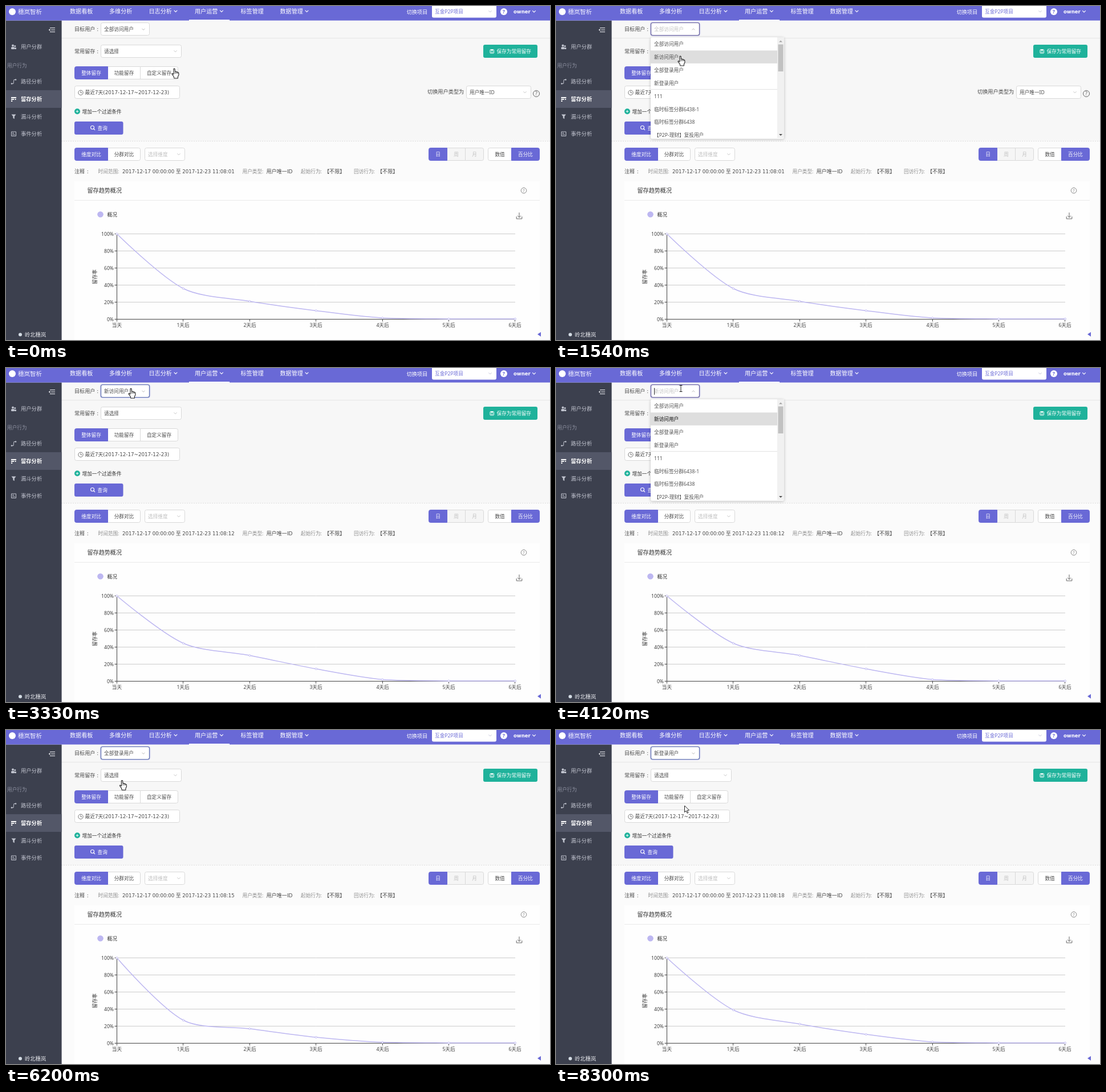
An HTML page with a canvas for the animation above (8.45 s loop, 954x587 px).

```html
<!DOCTYPE html>
<html lang="zh-CN">
<head>
<meta charset="utf-8">
<title>留存分析</title>
<style>
html, body { margin: 0; width: 100%; height: 100%; overflow: hidden; background: #fbfbfb; }
canvas { display: block; }
</style>
</head>
<body>
<canvas id="stage" width="954" height="587"></canvas>
<script>
const ctx = document.getElementById('stage').getContext('2d');
const LOOP = 8450;
const CJK = '"Noto Sans CJK SC", "Noto Sans CJK JP", "Noto Sans CJK", sans-serif';
const SANS = '"Noto Sans", ' + CJK;
const WIDE = '"DejaVu Sans", ' + CJK;
const PURPLE = '#6969d6', TEAL = '#1fb29b', INK = '#4a4a4a', LINE = '#d9d9d9', SOFT = '#bdb7f1';

const users = ['全部访问用户', '新访问用户', '全部登录用户', '新登录用户'];
const groups = ['111', '临时标签分群6438-1', '临时标签分群6438', '【P2P-理财】复投用户'];
const curves = [
  [100, 36, 21, 10, 1.5, .4, .4],
  [100, 44.5, 30.2, 14.5, 2, .4, .4],
  [100, 27, 17, 7, 1.1, .4, .4],
  [100, 39, 22.5, 10.4, 1.5, .4, .4]
];
const seconds = ['01', '12', '15', '18'];
const menus = [
  { open: 440, close: 1750, blink: 0 },
  { open: 3850, close: 5030, blink: 3770 },
  { open: 6620, close: 7650, blink: 6620 }
];
const morphs = [[2110, 2415], [5500, 5820], [8000, 8295]];
const path = [
  [70, 295, 110], [380, 219, 37], [560, 219, 37], [840, 219, 91], [1000, 219, 91],
  [1250, 220, 84], [1520, 218, 88], [2980, 218, 88], [3320, 219, 36], [4180, 219, 36],
  [4500, 218, 119], [5050, 218, 119], [5270, 217, 111], [5360, 217, 111], [5820, 217, 114],
  [6080, 217, 114], [6250, 200, 82], [6430, 216, 37], [6910, 216, 37], [7440, 225.5, 133]
];

const clamp = v => Math.max(0, Math.min(1, v));
const smooth = v => v * v * (3 - 2 * v);
const cubicOut = v => 1 - (1 - v) ** 3;

function text(s, x, y, size = 8.65, color = INK, o = {}) {
  ctx.font = `${o.weight || 400} ${size}px ${o.font || SANS}`;
  ctx.textAlign = o.align || 'left';
  ctx.fillStyle = color;
  ctx.fillText(s, x, y + size * .37);
}
function rect(x, y, w, h, color) {
  ctx.fillStyle = color;
  ctx.fillRect(x, y, w, h);
}
function box(x, y, w, h, fill, stroke, r = 3, lw = 1) {
  ctx.beginPath();
  ctx.roundRect(x, y, w, h, r);
  if (fill) { ctx.fillStyle = fill; ctx.fill(); }
  if (stroke) { ctx.strokeStyle = stroke; ctx.lineWidth = lw; ctx.stroke(); }
}
function line(pts, color, lw = 1) {
  ctx.beginPath();
  pts.forEach(p => ctx.lineTo(p[0], p[1]));
  ctx.strokeStyle = color;
  ctx.lineWidth = lw;
  ctx.stroke();
}
function poly(pts, fill, stroke, lw = 1) {
  ctx.beginPath();
  pts.forEach(p => ctx.lineTo(p[0], p[1]));
  ctx.closePath();
  ctx.fillStyle = fill;
  ctx.fill();
  if (stroke) { ctx.strokeStyle = stroke; ctx.lineWidth = lw; ctx.stroke(); }
}
function disc(x, y, r, fill, stroke, lw = 1) {
  ctx.beginPath();
  ctx.arc(x, y, r, 0, 7);
  if (fill) { ctx.fillStyle = fill; ctx.fill(); }
  if (stroke) { ctx.strokeStyle = stroke; ctx.lineWidth = lw; ctx.stroke(); }
}
function chevron(x, y, color, up = 1, w = 2.5, lw = 1) {
  line([[x - w, y - up * w / 2], [x, y + up * w / 2], [x + w, y - up * w / 2]], color, lw);
}
function help(x, y, r, color) {
  disc(x, y, r, null, color);
  text('?', x, y, r * 1.6, color, { align: 'center' });
}
function select(x, y, w, label, color = INK) {
  box(x + .5, y + .5, w, 22, '#fff', LINE);
  text(label, x + 6, y + 12, 8.65, color);
  chevron(x + w - 10, y + 11.5, '#c4c4c4');
}
// Joined buttons; kind is 'on', 'off' or 'dim'. The active one overlaps its neighbours.
function tabs(y, edges, labels, kinds) {
  const end = labels.length - 1;
  const order = [...labels.keys()].sort((a, b) => (kinds[a] === 'on') - (kinds[b] === 'on'));
  order.forEach(i => {
    const x = edges[i], w = edges[i + 1] - x, k = kinds[i];
    const first = i === 0 ? 3 : 0, last = i === end ? 3 : 0;
    const fill = { on: PURPLE, off: '#fff', dim: '#f5f5f5' }[k];
    box(x + .5, y + .5, w, 22, fill, k === 'on' ? PURPLE : LINE, [first, last, last, first]);
    text(labels[i], x + w / 2 + .5, y + 12, 8.65, { on: '#fff', off: INK, dim: '#c0c0c0' }[k],
      { align: 'center', weight: k === 'on' ? 500 : 400 });
  });
}

function header() {
  rect(0, 0, 954, 25.5, PURPLE);
  disc(11, 10, 6, '#fff');
  text('穗岚智析', 21, 10.5, 10.5, '#f0f0ff', { weight: 500 });
  [['数据看板', 112], ['多维分析', 181], ['日志分析', 250.5, 1], ['用户运营', 331, 1],
   ['标签管理', 411.5], ['数据管理', 480.5, 1]].forEach(([s, x, sub]) => {
    text(s, x, 9, 10.1, '#fff', { weight: 500 });
    if (sub) chevron(x + 47, 9, '#fff', 1, 2.8, 1.1);
  });
  rect(321, 24, 71, 2, '#fff');
  text('切换项目', 702.5, 10.5, 9.2, '#fff');
  box(747, -4, 113, 24.5, '#fff', null);
  text('互金P2P项目', 752, 10, 8.65, PURPLE);
  chevron(849, 9.5, '#c4c4d8');
  disc(873, 10, 6, '#fff');
  text('?', 873, 10, 9, PURPLE, { align: 'center', weight: 700 });
  text('owner', 890, 9.5, 8.5, '#fff', { weight: 700, font: WIDE });
  chevron(926, 9.5, '#fff', 1, 2.8, 1.1);
}

function sidebar() {
  const c = '#c0c3ce';
  rect(0, 25.5, 97.6, 562, '#3c404e');
  rect(0, 148, 97.6, 31, '#535768');
  [38.5, 42, 45.5].forEach((y, i) => line([[i === 1 ? 79 : 77, y], [86, y]], '#e4e5ea', 1.1));
  poly([[74.5, 42], [77.5, 40], [77.5, 44]], '#e4e5ea');
  text('用户行为', 2, 104.5, 8.65, '#8d90a0');
  [['用户分群', 72], ['路径分析', 133], ['留存分析', 163.5], ['漏斗分析', 194.5], ['事件分析', 225]]
    .forEach(([s, y]) => {
      const on = y === 163.5;
      text(s, 26, y, 9.3, on ? '#fff' : c, { weight: on ? 700 : 400 });
    });
  disc(12, 69.5, 1.9, c);
  box(9, 72, 6, 4, c, null, 1.5);
  disc(15.8, 70.5, 1.5, c);
  box(15, 73, 3, 3, c, null, 1);
  line([[10, 136.5], [13, 136.5], [13.5, 132], [14, 129.5], [17, 129.5]], c);
  disc(10, 136.5, 1.3, c);
  disc(17, 129.5, 1.3, c);
  rect(9, 160, 9, 2, '#fff');
  rect(9, 163, 5, 2, '#fff');
  rect(9, 166, 2.2, 2, '#fff');
  rect(15.5, 163, 2, 2, '#fff');
  poly([[9.5, 190.5], [17.5, 190.5], [14.8, 194], [14.8, 198.5], [12.3, 197], [12.3, 194]], c);
  box(9.5, 221, 8, 7.5, null, c, 0);
  line([[11, 223.5], [14, 223.5]], c);
  line([[11, 226], [16, 226]], c);
  disc(25, 577.5, 3, '#d3dbe3');
  text('岭北穗岚', 33, 577.5, 9.3, '#e9eaef');
}

function form(s) {
  rect(97, 25.5, 857, 212, '#f7f7f7');
  rect(97, 56, 857, 1, '#e6e6e6');
  ctx.setLineDash([2, 2]);
  line([[97, 237.5], [954, 237.5]], '#dedede');
  ctx.setLineDash([]);

  text('目标用户', 120, 41, 9.1);
  text(':', 159.5, 41, 9.1);
  const focus = s.t > menus[0].open;
  if (focus) box(165.5, 28.5, 87, 24, null, 'rgba(105,105,214,.2)', 4, 2);
  box(166.5, 29.5, 85, 22, '#fff', focus ? (s.open ? '#625b9b' : '#5a6cae') : LINE, 3, focus ? 1.2 : 1);
  text(users[s.pick], 172, 41, 8.65, s.open ? '#c2c2c2' : INK);
  chevron(241, 41, '#bbb', s.open ? -1 : 1);
  if (s.caret) rect(172, 35, 1, 12, '#333');

  text('常用留存', 120, 80, 9.1);
  text(':', 159.5, 80, 9.1);
  select(166, 68, 141, '请选择');
  if (s.hover) box(166.5, 68.5, 141, 22, null, '#6c6c98', 3, 1.1);

  box(837, 68, 95, 23, TEAL, null);
  box(849, 76.5, 6.5, 6.5, null, '#fff', 1);
  rect(850.5, 76.5, 3.5, 2.2, '#fff');
  rect(850.5, 80.5, 3.5, 1, '#fff');
  text('保存为常用留存', 860.5, 80, 8.65, '#fff', { weight: 500 });

  tabs(106, [120, 178, 235, 301], ['整体留存', '功能留存', '自定义留存'], ['on', 'off', 'off']);
  box(120.5, 140.5, 184, 22, '#fff', LINE);
  disc(131, 152.3, 4.2, null, '#666', .9);
  line([[131, 149.5], [131, 152.5], [133.3, 152.5]], '#666', .9);
  text('最近7天(2017-12-17~2017-12-23)', 138.5, 152, 8.75, INK, { font: WIDE });
  if (s.t < menus[0].close) {
    text('切换用户类型为', 739, 151, 9.2);
    select(807, 140, 113, '用户唯一ID');
    help(930, 154, 5.5, '#666');
  }
  disc(125, 185.3, 5, TEAL);
  line([[122.7, 185.3], [127.3, 185.3]], '#fff');
  line([[125, 183], [125, 187.6]], '#fff');
  text('增加一个过滤条件', 133.5, 185.7, 8.65, '#333');
  box(120, 203, 85.5, 23, PURPLE, null);
  disc(151.5, 213.5, 3, null, '#fff', 1.1);
  line([[153.6, 215.6], [156, 218]], '#fff', 1.2);
  text('查询', 160.5, 215, 8.65, '#fff', { weight: 500 });
}

function report(s) {
  rect(97, 238, 857, 349, '#fbfbfb');
  tabs(249, [120, 178, 235], ['维度对比', '分群对比'], ['on', 'off']);
  select(243, 249, 70, '选择维度', '#c0c0c0');
  tabs(249, [741, 773, 805, 837], ['日', '周', '月'], ['on', 'dim', 'dim']);
  tabs(249, [845, 886, 935], ['数值', '百分比'], ['off', 'on']);

  text('注释', 120, 290.5, 9.1);
  text(':', 142, 290.5, 9.1);
  [['时间范围:', 161.5], ['用户类型:', 414.5], ['起始行为:', 517], ['回访行为:', 610]]
    .forEach(([l, x]) => text(l, x, 290.5, 8.65, '#8c8c8c'));
  text(`2017-12-17 00:00:00 至 2017-12-23 11:08:${seconds[s.pick]}`, 204, 290.5, 8.6, INK, { font: WIDE });
  text('用户唯一ID', 456.5, 290.5, 9.1, INK, { font: WIDE });
  text('【不限】', 558, 290.5, 9.1);
  text('【不限】', 651, 290.5, 9.1);

  rect(120, 308, 816, 279, '#fefefe');
  rect(120, 341, 816, 1, '#e9e9e9');
  text('留存趋势概况', 142.5, 324.5, 10.1, '#333', { weight: 500 });
  help(908, 324.3, 4.8, '#888');
  disc(165.5, 366.3, 5.3, SOFT);
  text('概况', 177.5, 367, 8.65, '#333', { weight: 500 });
  line([[900, 363], [900, 371.5]], '#666');
  line([[897, 368.5], [900, 371.5], [903, 368.5]], '#666');
  line([[895.2, 370], [895.2, 374], [904.8, 374], [904.8, 370]], '#666');
  chart(s.values);
  poly([[932, 577], [938, 573], [938, 581]], PURPLE);
}

function chart(values) {
  const left = 194.5, step = 116.4, base = 550.5, bend = .3;
  for (let i = 0; i <= 5; i++) {
    const y = base - i * 30;
    if (i) line([[left, y], [893, y]], '#ccc');
    line([[left - 4, y], [left, y]], '#444');
    text(i * 20 + '%', 189, y + .3, 8.65, '#444', { align: 'right' });
  }
  line([[left, 400], [left, base]], '#444');
  line([[left, base], [893, base]], '#444');
  for (let i = 0; i < 7; i++) {
    const x = Math.floor(left + i * step) + .5;
    line([[x, base], [x, base + 4]], '#444');
    text(i ? i + '天后' : '当天', x, 560.5, 8.65, '#444', { align: 'center' });
  }
  ctx.save();
  ctx.translate(155.5, 476);
  ctx.rotate(-Math.PI / 2);
  text('留存率', 0, 0, 8.65, '#333', { align: 'center', weight: 500 });
  ctx.restore();

  const pts = values.map((v, i) => [left + i * step, base - v * 1.5]);
  const dist = (a, b) => Math.hypot(a[0] - b[0], a[1] - b[1]);
  const keep = y => Math.max(pts[0][1], Math.min(pts[6][1], y));
  let out = pts[0];
  ctx.beginPath();
  ctx.moveTo(...pts[0]);
  for (let i = 1; i < 7; i++) {
    const p = pts[i], prev = pts[i - 1], next = pts[i + 1];
    let into = p, after = p;
    if (next) {
      const vx = (next[0] - prev[0]) * bend, vy = (next[1] - prev[1]) * bend;
      const r = dist(p, next) / (dist(p, next) + dist(p, prev));
      into = [p[0] - vx * (1 - r), keep(p[1] - vy * (1 - r))];
      after = [p[0] + vx * r, keep(p[1] + vy * r)];
    }
    ctx.bezierCurveTo(...out, ...into, ...p);
    out = after;
  }
  ctx.strokeStyle = SOFT;
  ctx.lineWidth = 1.5;
  ctx.stroke();
  pts.forEach(p => disc(p[0], p[1], 1.6, '#fff', SOFT, .9));
}

function dropdown(s) {
  if (s.show <= 0) return;
  ctx.save();
  ctx.globalAlpha = s.show;
  ctx.translate(0, 55);
  ctx.scale(1, .8 + .2 * s.show);
  ctx.translate(0, -55);
  ctx.shadowColor = 'rgba(0,0,0,.24)';
  ctx.shadowBlur = 5;
  ctx.shadowOffsetY = 1;
  box(166, 55, 234, 178.5, '#fff', null);
  ctx.shadowColor = 'transparent';
  ctx.beginPath();
  ctx.rect(166, 55, 234, 177);
  ctx.clip();
  rect(166, 55.5 + s.row * 22.7, 222, 22.7, '#dedede');
  users.forEach((u, i) =>
    text(u, 172, 67.2 + i * 22.7, 8.65, '#505050', { weight: i && i === s.chosen ? 700 : 400 }));
  rect(166, 146, 222, 1, '#e2e2e2');
  groups.forEach((g, i) => text(g, 172, 158.8 + i * 22.7, 8.65, '#555'));
  rect(388, 55, 12, 178, '#f1f1f1');
  rect(389.5, 67.5, 9, 47.5, '#c1c1c1');
  poly([[391, 63.5], [394, 60.5], [397, 63.5]], '#a3a3a3');
  poly([[391, 225], [394, 228], [397, 225]], '#505050');
  ctx.restore();
}

function pointer({ x, y, kind }) {
  ctx.save();
  ctx.translate(x, y);
  ctx.lineJoin = 'round';
  if (kind === 'beam') {
    line([[-2.5, -5.5], [2.5, -5.5]], '#222');
    line([[-2.5, 5.5], [2.5, 5.5]], '#222');
    line([[0, -5.5], [0, 5.5]], '#222');
  } else if (kind === 'arrow') {
    poly([[0, 0], [0, 11.5], [2.7, 9], [4.6, 13.3], [6.4, 12.4], [4.6, 8.3], [8, 8]], '#fff', '#222');
  } else {
    poly([[-1, .8], [0, 0], [1.2, .8], [1.4, 5.2], [3.2, 5], [3.8, 6], [5.5, 5.8], [6.2, 6.8],
      [7.7, 7], [8, 11], [6.5, 14], [6.3, 17], [-.2, 17], [-.8, 14], [-4, 9.6],
      [-3.4, 8.4], [-1, 10]], '#fff', '#222', 1.1);
    [1.5, 3.8, 6].forEach(fx => line([[fx, 6], [fx, 9]], '#222', .8));
  }
  ctx.restore();
}

function place(t) {
  const i = path.findIndex(k => k[0] > t);
  if (i === 0) return path[0].slice(1);
  if (i < 0) return path[path.length - 1].slice(1);
  const a = path[i - 1], b = path[i], k = smooth((t - a[0]) / (b[0] - a[0]));
  return [a[1] + (b[1] - a[1]) * k, a[2] + (b[2] - a[2]) * k];
}

function stateAt(t) {
  const [x, y] = place(t);
  const menu = menus.find(m => t >= m.open && t < m.close);
  const pick = menus.filter(m => t >= m.close).length;
  const last = menus.filter(m => t >= m.open).pop();
  let show = 0;
  if (last) show = smooth(clamp((t - last.open) / 200)) * (1 - smooth(clamp((t - last.close) / 200)));
  const values = curves[0].map((v, i) => morphs.reduce((from, [a, b], n) =>
    from + (curves[n + 1][i] - from) * cubicOut(clamp((t - a) / (b - a))), v));

  const overSelect = y >= 68 && y < 91;
  const overField = y < 52 || overSelect || (y >= 106 && y < 130);
  const kind = menu ? (y < 52 ? 'beam' : 'hand') : (overField ? 'hand' : 'arrow');
  const chosen = menu ? pick : pick - 1;
  const row = show && y > 55 ? Math.min(3, Math.floor((y - 55.5) / 22.7)) : chosen;
  return {
    t, x, y, kind, pick, chosen, row, show, values,
    open: !!menu,
    caret: menu && (t - menu.blink) % 1000 < 500,
    hover: !menu && overSelect && pick === 1
  };
}

function draw(t) {
  const s = stateAt(t);
  ctx.clearRect(0, 0, 954, 587);
  form(s);
  report(s);
  sidebar();
  header();
  dropdown(s);
  pointer(s);
}

const start = performance.now();
function tick() {
  draw((performance.now() - start) % LOOP);
  requestAnimationFrame(tick);
}
tick();
</script>
</body>
</html>
```
